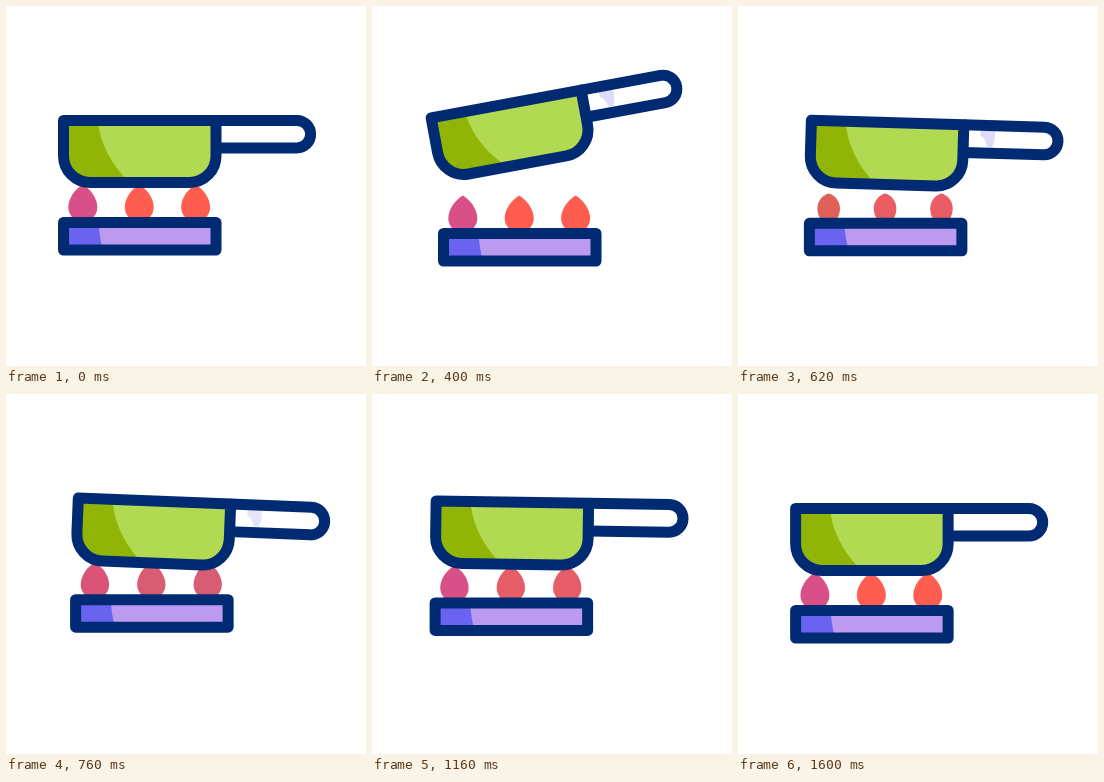
Animation of 360 by 360 pixels, one loop 1.62 s. Source, as an HTML page with a canvas:

```html
<!DOCTYPE html>
<html>
<head>
<meta charset="utf-8">
<style>
  html, body { margin: 0; width: 100%; height: 100%; overflow: hidden; background: #fff; }
  canvas { display: block; width: 100vmin; height: 100vmin; }
</style>
</head>
<body>
<canvas id="stage" width="360" height="360"></canvas>
<script>
const ctx = document.getElementById('stage').getContext('2d');
const LOOP = 1620;
const NAVY = '#002a72';
const PINK = [217, 79, 135], RED = [255, 93, 80];
const CORAL = [224, 96, 90], ROSE = [200, 92, 128];

const mix = (a, b, k) => a + (b - a) * k;
const blend = (a, b, k) => `rgb(${a.map((v, i) => Math.round(mix(v, b[i], k))).join()})`;

// Gentle ease: halfway between linear and a cosine.
const ease = u => (u + (1 - Math.cos(Math.PI * u)) / 2) / 2;

// Eases through [time, value] stops and holds the values at both ends.
function follow(t, ...stops) {
  const next = stops.findIndex(([time]) => time > t);
  if (next < 0) return stops[stops.length - 1][1];
  if (next === 0) return stops[0][1];
  const [t0, v0] = stops[next - 1], [t1, v1] = stops[next];
  return mix(v0, v1, ease((t - t0) / (t1 - t0)));
}

const burner = new Path2D('M57.5 216.5H210V244H57.5Z');
const burnerShade = new Path2D('M50 210H92Q92.5 228 98 250H50Z');
const body = new Path2D('M57.5 114.5H210V150A26.5 26.5 0 0 1 183.5 176.5H84A26.5 26.5 0 0 1 57.5 150Z');
const bodyShade = new Path2D('M50 108H92.5V120Q97 148 119 172V185H50Z');
const handle = new Path2D('M210 114.5H290.8A13.8 13.8 0 0 1 290.8 142.1H210');
const glint = new Path2D('M227 119H241Q243 126 239 136H234Q232 127 227 125Z');

function outline(path) {
  ctx.strokeStyle = NAVY;
  ctx.lineWidth = 11;
  ctx.lineJoin = 'round';
  ctx.stroke(path);
}

// Fills a shape, darkens one part of it and outlines the whole.
function shaded(path, light, dark, shade) {
  ctx.save();
  ctx.clip(path);
  ctx.fillStyle = light;
  ctx.fill(path);
  ctx.fillStyle = dark;
  ctx.fill(shade);
  ctx.restore();
  outline(path);
}

// size runs from 0, a small egg, to 1, a tall drop.
function flame(x, size, color) {
  const w = mix(11.2, 14.5, size), top = mix(-14.7, -23, size);
  const tipX = mix(5, 7, size), tipY = top + mix(1, 4, size);
  const shoulder = mix(-8, -10, size);
  ctx.save();
  ctx.translate(x, 201.5);
  ctx.fillStyle = color;
  ctx.beginPath();
  ctx.moveTo(0, top);
  ctx.bezierCurveTo(tipX, tipY, w, shoulder, w, 0);
  ctx.bezierCurveTo(w, 8, 7, 15, 0, 15);
  ctx.bezierCurveTo(-7, 15, -w, 8, -w, 0);
  ctx.bezierCurveTo(-w, shoulder, -tipX, tipY, 0, top);
  ctx.fill();
  ctx.restore();
}

function drawStove(t) {
  // Three flickers, then the flames stay full.
  const size = t < 1200 ? (1 + Math.cos(t / 200 * Math.PI)) / 2 : 1;
  const pink = blend(PINK, CORAL, follow(t, [400, 0], [620, 1], [840, 0]));
  const red = blend(RED, ROSE, follow(t, [400, 0], [940, 1], [1360, 0]));
  for (let i = 0; i < 3; i++) flame(76.8 + 56.4 * i, size, i ? red : pink);
  shaded(burner, '#bb9af0', '#6a63f0', burnerShade);
}

function drawPan(t) {
  const lift = follow(t, [0, 0], [200, -16], [340, -16], [660, 0]);
  const tilt = follow(t, [0, 0], [390, -10.8], [640, 2.3], [900, 2.3], [1340, 0]);
  // The pan tips around its lower left corner.
  ctx.translate(52, 182 + lift);
  ctx.rotate(tilt * Math.PI / 180);
  ctx.translate(-52, -182);
  ctx.fillStyle = '#fff';
  ctx.fill(handle);
  ctx.globalAlpha = follow(t, [0, 0], [160, 1], [700, 1], [900, 0]);
  ctx.fillStyle = '#dcdcf8';
  ctx.fill(glint);
  ctx.globalAlpha = 1;
  outline(handle);
  shaded(body, '#b1d952', '#90b506', bodyShade);
}

function draw(t) {
  ctx.fillStyle = '#fff';
  ctx.fillRect(0, 0, 360, 360);
  ctx.save();
  ctx.translate(
    follow(t, [0, 0], [460, 15.3], [LOOP, 0]),
    follow(t, [0, 0], [460, 12], [820, -13.8], [1560, 0])
  );
  drawStove(t);
  drawPan(t);
  ctx.restore();
}

function tick() {
  draw(performance.now() % LOOP);
  requestAnimationFrame(tick);
}
tick();
</script>
</body>
</html>
```
